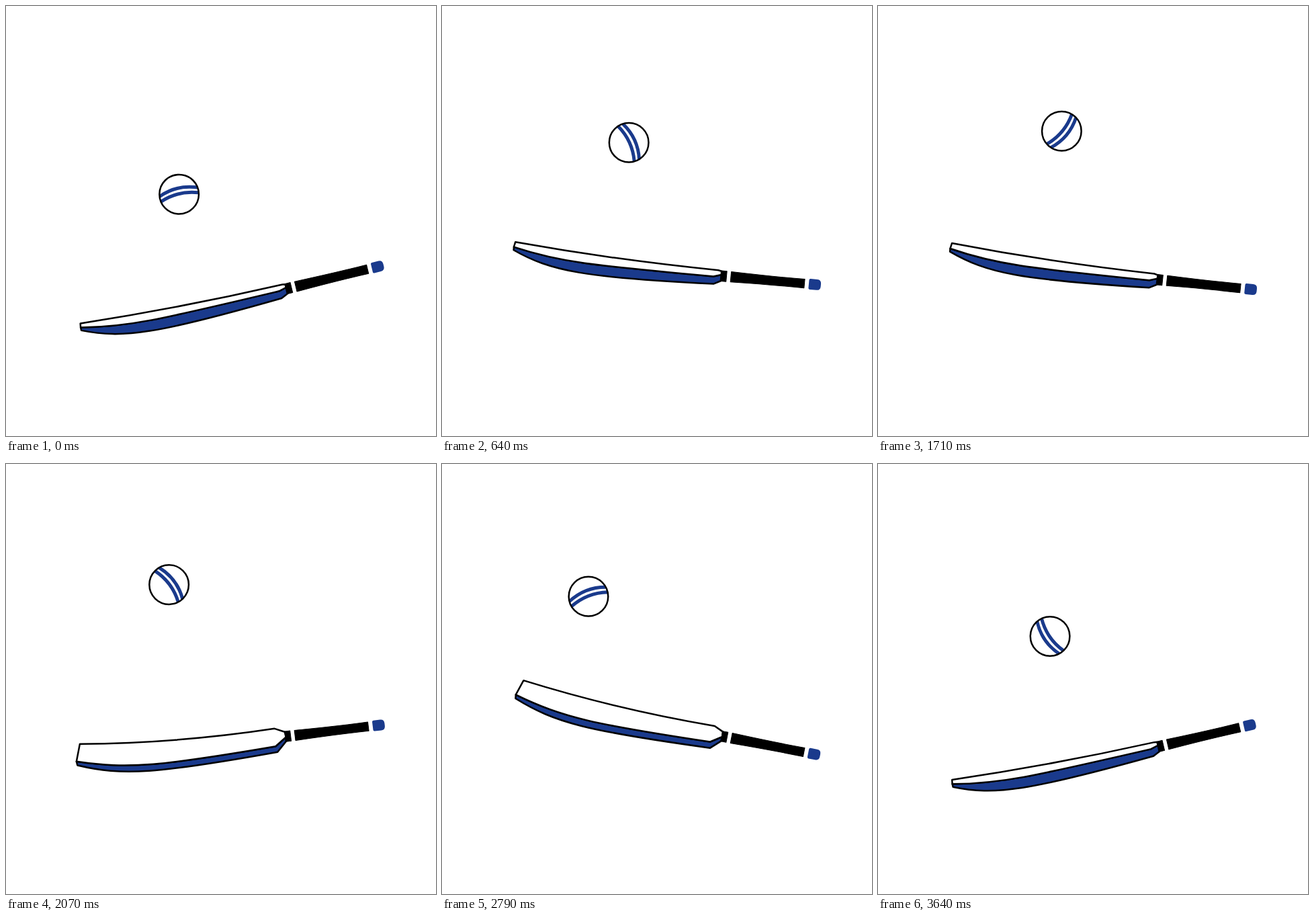
An HTML page that plays this animation: 640x640 px, repeating every 3710 ms.

```html
<!DOCTYPE html>
<html lang="en">
<head>
<meta charset="utf-8">
<title>Bat and ball</title>
<style>
  html, body { margin: 0; width: 100%; height: 100%; overflow: hidden; background: #fff; }
  svg { display: block; width: 100vw; height: 100vh; }
  .line { stroke: #000; stroke-width: 2.5; stroke-linejoin: round; stroke-linecap: round; }
  .blue { fill: #1a3a8c; }
  .white { fill: #fff; }
  .seam { fill: none; stroke: #1a3a8c; stroke-width: 5; }
</style>
</head>
<body>
<svg viewBox="0 0 640 640">
  <defs><clipPath id="round"><circle r="29"/></clipPath></defs>
  <g id="bat">
    <path id="edge" class="line blue"/>
    <path id="face" class="line white"/>
    <path d="M-4-7.7H4V7.7H-4Z" stroke="#000" stroke-linejoin="round"/>
    <path d="M10.5-7.6Q75-6 120.5-6.7V6.7Q75 6 10.5 7.6Z" stroke="#000" stroke-linejoin="round"/>
    <path class="blue" d="M129-8H139Q145-8 145-2V2Q145 8 139 8H129Q127 8 127 6V-6Q127-8 129-8Z"/>
  </g>
  <g id="ball">
    <circle class="white" r="29.3"/>
    <g id="spin" clip-path="url(#round)">
      <path class="seam" d="M3.5-29Q15 0 3.5 29M-4.5-29Q6 0-4.5 29"/>
    </g>
    <circle class="line" fill="none" r="29.3"/>
  </g>
</svg>
<script>
const LOOP = 3710, FPS = 14, LAST = 51;
const $ = id => document.getElementById(id);
const mix = (a, b, p) => a + (b - a) * p;

// Apex and hit by turns: time, x, y, spin
const TOSS = [
  [-537, 233, 129, -168], [153, 264.7, 385, -85],
  [760, 281.5, 197, -10], [1222, 315, 376, 99],
  [1925, 255, 169, 14], [2505, 205.6, 364, -189],
  [3145, 233.4, 129, -15], [3835, 265, 385, 209]
];
// Low and high by turns: time, tilt, neck height, roll of the blade
const SWING = [
  [10, -13.6, 420, 0], [350, 7.2, 399.5, .08],
  [1070, -8, 420, 0], [1402, 7.6, 408, 0],
  [2290, -13, 404, 1.2], [2735, 11, 406, .75],
  [3690, -13.6, 420, 0]
];

// The two keys around t, how far along, and whether the first key is an even one
function between(keys, t) {
  let i = 0;
  while (i < keys.length - 2 && t >= keys[i + 1][0]) i++;
  const a = keys[i], b = keys[i + 1];
  const p = Math.min(1, Math.max(0, (t - a[0]) / (b[0] - a[0])));
  return { a, b, p, even: i % 2 === 0 };
}

// Even drift and spin, height bent by gravity
function ballAt(t) {
  const { a, b, p, even } = between(TOSS, t);
  const fall = even ? p ** 2.1 : 1 - (1 - p) ** 2.1;
  return { x: mix(a[1], b[1], p), y: mix(a[2], b[2], fall), spin: mix(a[3], b[3], p) };
}

// Quick swing up, then a lingering drop
function batAt(t) {
  const { a, b, p, even } = between(SWING, t);
  const ease = (1 - Math.cos(Math.PI * (even ? p : p ** 1.6))) / 2;
  const [, tilt, y, roll] = a.map((v, i) => mix(v, b[i], ease));
  return { x: 484.2 - 65 * Math.cos(tilt * Math.PI / 180), y, tilt, roll };
}

function drawBlade(r) {
  const pt = (x0, y0, x1, y1) => `${mix(x0, x1, r).toFixed(2)} ${mix(y0, y1, r).toFixed(2)} `;
  const tip = pt(-314, -22, -308, -26.4);
  const ridge = pt(-315, -16, -317.4, 2.3);
  const heel = pt(-315, -11.5, -316.5, 8.3);
  const curve = 'C' + pt(-245, 0, -240, 24) + pt(-200, 0, -190, 25) + pt(-15, .8, -21, 15);
  const neck = pt(-4, -2, -3, 1.5);
  $('face').setAttribute('d',
    'M' + ridge + curve + 'L' + neck + 'L-4 -7 L' + pt(-8, -7.6, -20.4, -14.8)
    + 'Q-164 -9.4 ' + tip + 'Z');
  $('edge').setAttribute('d',
    'M' + ridge + curve + 'L' + neck + 'L-4 7.5 L' + pt(-14, 12, -19, 23.2)
    + 'C' + pt(-208, 20, -200, 34) + pt(-258, 15, -250, 32) + heel + 'Z');
}

function draw(t) {
  const bat = batAt(t), ball = ballAt(t);
  $('bat').setAttribute('transform', `translate(${bat.x} ${bat.y}) rotate(${bat.tilt})`);
  drawBlade(bat.roll);
  $('ball').setAttribute('transform', `translate(${ball.x} ${ball.y})`);
  $('spin').setAttribute('transform', `rotate(${ball.spin})`);
}

// The picture advances in steps, rounded to hundredths of a second
const stepStart = n => Math.round(n * 100 / FPS) * 10;

function tick() {
  const t = performance.now() % LOOP;
  let n = Math.min(LAST, Math.floor((t + 5) * FPS / 1000));
  if (stepStart(n) > t) n--;
  draw(stepStart(n));
  requestAnimationFrame(tick);
}
tick();
</script>
</body>
</html>
```
